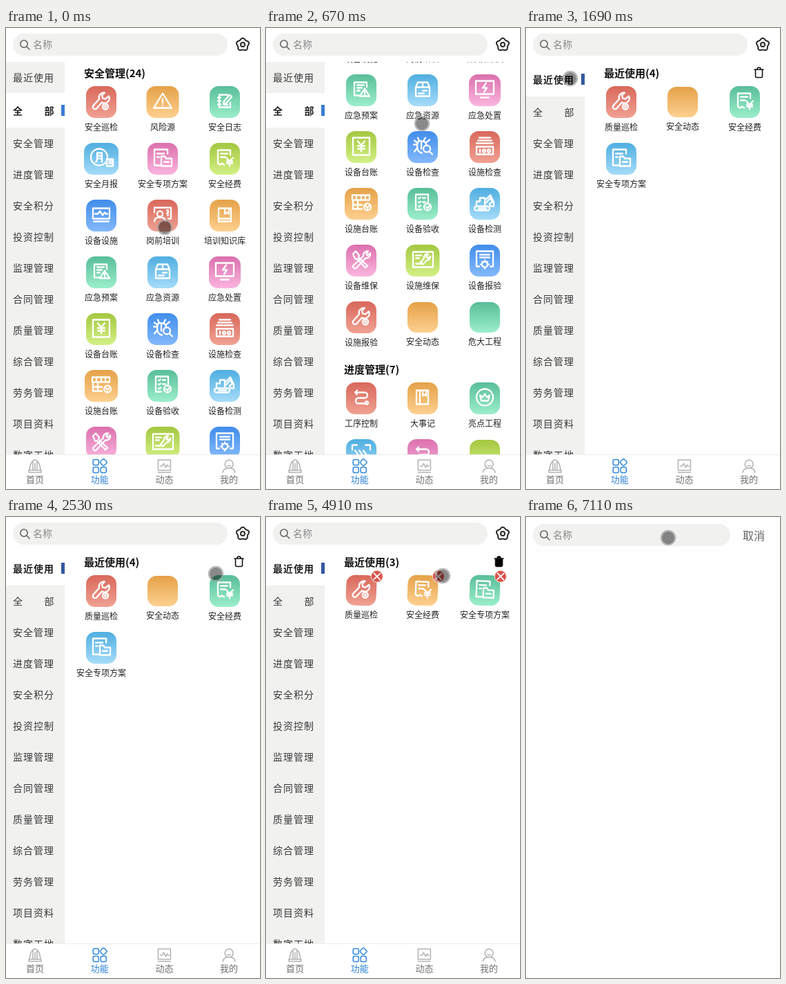
Animation, 368 px wide and 666 px high, one loop 8 s. Source, as an HTML page:

```html
<!DOCTYPE html>
<html lang="zh-CN">
<head>
<meta charset="utf-8">
<title>功能</title>
<style>
html, body { margin: 0; width: 100%; height: 100%; overflow: hidden; background: #fff; }
svg { display: block; width: 368px; height: 666px; }
text { font-family: "Noto Sans CJK SC", "Noto Sans CJK", "Noto Sans", sans-serif; }
.line { fill: none; stroke-linecap: round; stroke-linejoin: round; }
.glyph { stroke: #fff; stroke-width: 2.3; }
</style>
</head>
<body>
<svg id="stage" viewBox="0 0 368 666">
  <defs id="defs">
    <clipPath id="view"><rect y="49" width="368" height="567"/></clipPath>
  </defs>
  <g id="main">
    <g clip-path="url(#view)">
      <g id="all"></g>
      <g id="recent"></g>
      <g id="side"></g>
    </g>
    <g id="frame"></g>
  </g>
  <g id="search"></g>
  <g id="pointer">
    <circle r="9.2" fill="#000" fill-opacity=".46"/>
    <circle r="10.2" fill="none" stroke="#a0a0a0" stroke-opacity=".75" stroke-width="2"/>
  </g>
</svg>
<script>
const LOOP = 8000, TICK = 169.2;
const $ = id => document.getElementById(id);

// Glyph outlines, centred on 0,0
const circle = (x, y, r) => `M${x - r} ${y}a${r} ${r} 0 1 0 ${2 * r} 0a${r} ${r} 0 1 0 ${-2 * r} 0`;
const glyphs = {
  wrench: 'M5-12a7 7 0 0 0-8 9L-11 6a3 3 0 0 0 4 5L1 2a7 7 0 0 0 10-9L6-3 2-4 1-8z' + circle(6, 8, 4) + circle(6, 8, 1),
  warn: 'M0-11L13 10H-13zM0-3V3M0 6.5v.2',
  log: 'M4-9H-8V9H8V2M-10-5h4M-10 0h4M-10 5h4M-2 4l1-4 8-9 3 3-8 9zM-2 5h6',
  month: circle(-3, -1, 12) + 'M-6-7H1V6M-6-7V1q0 4-2 5M-6-3H1M-6 1H1M8 2h9v10H8zM11 5h4M11 8h4',
  plan: 'M-4 11H-12V-12H7V-6M-8-6H2M-8-1h3M-2-2h5l2 3h8v11H-2zM2 6h7',
  fee: 'M-1 10l-3-2-3 2-3-2V-11H8V-4M-6-6H4M-6-1H1M2 0l5 5 5-5M7 5v7M3 5h8M3 8h8',
  wave: 'M-12-9h24v15h-24zM-11 10h22M-9-1h4l3-4 4 6 3-4 2 2h2',
  train: circle(-4, -1, 4) + 'M-12 10q0-6 8-6t8 6M-12-3v-7h24V6H8M6-6h2v4H6M7 1h1',
  book: 'M-9-9H9V10H-9zM-9 6H9M0-9v8l3-2 3 2v-8',
  alert: 'M8-3v-7h-18V9h7M-6-6H4M-6-2h7M-6 2h4M5-1l7 11H-2zM5 3v3M5 8v.2',
  box: 'M-10-3l3-7H7l3 7V10H-10zM-10-3h20M0-10v7M0 2h6M-6 6H2',
  bolt: 'M-13-12h26V7h-26zM-6 12H6M2-9l-5 7h6l-4 6',
  yen: 'M-12-12h24v25h-24zM-5-7l5 6 5-6M0-1v9M-5 0H5M-5 4H5',
  bug: 'M-1 10Q-8 9-8 0T-2-7Q5-7 5-2M-5-7l-2-5M1-7l3-5M-8-2h-5M-8 3l-4 5M-7-4l-5-4M-2-7V4M5-5l5-4' + circle(6, 4, 5) + 'M10 8l4 4',
  machine: 'M-8-12H8M-10-8h20M-12-4h24M-12 1h24v11h-24zM-7 5v4' + circle(-1, 7, 2) + circle(6, 7, 2),
  shop: 'M-13-11h25v7h-25zM-7-11v7M0-11v7M6-11v7M-12-3V9H1M-12 3H1M-5-2V8' + circle(9, 6, 5) + 'M6 4l3 3 3-3M9 7v3',
  check: 'M8-1v-11h-18v22H-2M-6-7l1 1 2-2M0-7h4M-6-1l1 1 2-2M0-1h4M-6 5l1 1 2-2' + circle(7, 6, 5) + 'M5 6l2 2 3-4',
  digger: 'M-12 5H4a3 3 0 0 1 0 6H-12a3 3 0 0 1 0-6M-12 4v-6h5v-5h7v11M-9 8H2M0-3l8-8 5 10v6q-6 1-6-4l4-2-3-6-6 7',
  tools: 'M-12-8l4-4 5 6-1 3L9 9l-3 3L-6-1l-3 0zM10-12a6 6 0 0 0-7 7L-11 8a2 2 0 0 0 4 4L6-2a6 6 0 0 0 7-7L9-6 7-8z',
  board: 'M-14-11h29v22h-29zM-10-6h8M-10-2h5M-10 6h7M8-8a5 5 0 0 0-6 6L-3 4l3 3 6-6a5 5 0 0 0 5-6L8-2 5-4z',
  report: 'M-8 10h-4v-22h24v22H8M-7-7H7M-7-3H7' + circle(0, 7, 4) + 'M0 1v2M0 11v2M-6 7h2M4 7h2M-4 3l1 1M3 4l1-1',
  flow: 'M-8-7H5a4 4 0 0 1 0 8H-4a4 4 0 0 0 0 8H6M-6-10l-3 3 3 3' + circle(8, 8, 2),
  album: 'M-9-10H8V10H-9zM-4-10V10M0-10V-2l2-2 3 2v-8',
  crown: circle(0, 0, 12) + 'M-5 5H5L7-3 3 0 0-5-3 0-7-3z',
  scan: 'M-13-6v-7h7M6-13h7v7M13 6v7H6M-6 13h-7V6M-9-5l4 5-4 5M-3-5l4 5-4 5M3-5l4 5-4 5'
};

const tones = [
  ['#d8685b', '#f0a193'], ['#e5a148', '#fdd090'], ['#58be98', '#9ceecb'], ['#4faee0', '#a6dcf9'],
  ['#db70ad', '#fab5de'], ['#a4c740', '#d3f086'], ['#418deb', '#84b9fb']
];
const columns = [138, 227, 317];

// label, glyph, tile width
const safety = [
  ['安全巡检', 'wrench'], ['风险源', 'warn', 47], ['安全日志', 'log'],
  ['安全月报', 'month', 50], ['安全专项方案', 'plan'], ['安全经费', 'fee'],
  ['设备设施', 'wave'], ['岗前培训', 'train'], ['培训知识库', 'book'],
  ['应急预案', 'alert'], ['应急资源', 'box'], ['应急处置', 'bolt', 46],
  ['设备台账', 'yen'], ['设备检查', 'bug'], ['设施检查', 'machine'],
  ['设施台账', 'shop', 48], ['设备验收', 'check'], ['设备检测', 'digger'],
  ['设备维保', 'tools'], ['设施维保', 'board', 49], ['设备报验', 'report'],
  ['设施报验', 'wrench'], ['安全动态'], ['危大工程']
];
const progress = [
  ['工序控制', 'flow'], ['大事记', 'album'], ['亮点工程', 'crown'],
  ['施工进度', 'scan'], ['工序检查Flow', 'flow'], ['进度上报'], ['工序上报']
];
const recents = [['质量巡检', 'wrench'], ['安全动态'], ['安全经费', 'fee'], ['安全专项方案', 'plan']];

const menu = ['最近使用', '全部', '安全管理', '进度管理', '安全积分', '投资控制', '监理管理',
  '合同管理', '质量管理', '综合管理', '劳务管理', '项目资料', '数字工地'];

// y is the middle of the characters
const text = (s, x, y, size, fill, extra = '') =>
  `<text x="${x}" y="${y + size * .38}" font-size="${size}" fill="${fill}" ${extra}>${s}</text>`;
const centred = 'text-anchor="middle"';
const path = (d, x, y, attrs) => `<path class="line" transform="translate(${x} ${y})" d="${d}" ${attrs}/>`;
const heading = (s, y) => text(s, 113, y, 15, '#111', 'font-weight="700"');

function tile([label, glyph, width = 44], i, top, height, angle, badge) {
  const x = columns[i % 3], mid = top + height / 2;
  const mark = glyph ? `<path class="line glyph" transform="translate(${x} ${mid - 1.5})" d="${glyphs[glyph]}"/>` : '';
  const cross = badge ? `<g transform="translate(${x + 22} ${top + 1})">
    <circle r="8.5" fill="#d9544c" stroke="#f6dcd8"/>
    <path class="line" d="M-4.5-4.5l9 9M4.5-4.5l-9 9" stroke="#fff" stroke-width="1.8"/></g>` : '';
  return `<g transform="rotate(${angle} ${x} ${mid})">
    <rect x="${x - width / 2}" y="${top}" width="${width}" height="${height}" rx="13" fill="url(#tone${i % 7})"/>
    ${mark}${cross}</g>` + text(label, x, top + height + 13, 12, '#222', centred);
}

function grid(items, top) {
  return items.map((item, i) => {
    const first = i - i % 3;
    const tall = items.slice(first, first + 3).some(it => it[1]);
    const shift = tall && !item[1] ? 1 : 0;
    return tile(item, i, top + first / 3 * 82 + shift, item[1] ? 46 : 44, 0, false);
  }).join('');
}

function recentPage(items, editing, angle) {
  const bin = 'M-6.5-4.5h13M-2.5-5q0-2.5 2.5-2.5t2.5 2.5M-5-4.5V5q0 2 2 2h6q2 0 2-2v-9.5';
  const body = editing
    ? items.map((it, i) => tile(it, i, 84 + 80 * Math.floor(i / 3), 44, angle, true)).join('')
    : grid(items, 84);
  return heading(`最近使用(${items.length})`, 65) + body +
    path(bin, 337.5, 64.5, `stroke="#111" stroke-width="1.6" style="fill:${editing ? '#000' : 'none'}"`);
}

function sidebar(active) {
  let y = 49, out = '<rect y="49" width="85" height="567" fill="#f1f1f0"/>';
  menu.forEach((name, i) => {
    const on = i === active, h = on ? 50 : 45, mid = y + h / 2 + .5;
    if (on) out += `<rect y="${y}" width="85" height="50" fill="#fff"/>
      <rect x="80" y="${y + 17}" width="5" height="16" fill="${i ? '#3a7dd4' : '#3459a0'}"/>`;
    const style = `letter-spacing="1" font-weight="${on ? 700 : 400}"`;
    const put = (s, x) => { out += text(s, x, mid, 14, on ? '#222' : '#3a3a3a', style); };
    if (name.length === 2) { put(name[0], 10); put(name[1], 55.5); }
    else put(name, 10);
    y += h;
  });
  return out;
}

function searchBox(y, width) {
  return `<rect x="10" y="${y}" width="${width}" height="32" rx="16" fill="#f1f1f0"/>` +
    path(circle(-1, -1, 5.2) + 'M3 3l4 4', 27, y + 16, 'stroke="#666" stroke-width="1.6"') +
    text('名称', 39, y + 16, 14, '#8a8a8a');
}

// Five-lobed cog with one lobe on top
function cog() {
  const points = Array.from({ length: 40 }, (_, i) => {
    const a = i * Math.PI / 20, r = 8.4 + Math.cos(5 * a);
    return `${(r * Math.sin(a)).toFixed(2)} ${(-r * Math.cos(a)).toFixed(2)}`;
  });
  return `M${points.join('L')}z` + circle(0, 0, 3);
}

function chrome() {
  const square = (x, y) => `M${x + 2} ${y}h4q2 0 2 2v4q0 2-2 2h-4q-2 0-2-2v-4q0-2 2-2z`;
  const diamond = 'M4.5-10q1-1 2 0l3.5 3.5q1 1 0 2L6.5-1q-1 1-2 0L1-4.5q-1-1 0-2z';
  const tabs = [
    ['首页', 'M-9 9V6H9v3zM-8 6Q-7-5-3-7M8 6Q7-5 3-7M-3 5V-7q0-2 3-2t3 2V5M0 5V-4'],
    ['功能', square(-9.5, -9.5) + square(-9.5, 1.5) + square(1.5, 1.5) + diamond],
    ['动态', 'M-9-9H9V6H-9zM-9 9H9M-6 0h3l2-4 3 6 2-4 1 2h2'],
    ['我的', circle(0, -3, 6) + 'M-9 9q1-5 6-6M9 9q-1-5-6-6M-2-1q2 2 4 0']
  ];
  return searchBox(8, 311) +
    path(cog(), 343, 24, 'stroke="#2b2b28" stroke-width="2"') +
    '<path d="M0 616.5H368" stroke="#ededed"/>' +
    tabs.map(([name, d], i) => {
      const x = 42 + 93.7 * i, on = i === 1;
      return path(d, x, 633, `stroke="${on ? '#2f88dd' : '#b2b2b2'}" stroke-width="1.5"`) +
        text(name, x, 652, 13, on ? '#2a80d8' : '#707070', centred);
    }).join('');
}

$('defs').innerHTML += tones.map(([a, b], i) => `<linearGradient id="tone${i}" x2="0" y2="1">
  <stop stop-color="${a}"/><stop offset="1" stop-color="${b}"/></linearGradient>`).join('');
$('all').innerHTML = heading('安全管理(24)', 65) + grid(safety, 84) +
  heading('进度管理(7)', 756) + grid(progress, 775) + heading('安全积分(6)', 1035);
$('frame').innerHTML = chrome();
$('search').innerHTML = '<rect width="368" height="666" fill="#fefefe"/>' + searchBox(10, 286) +
  text('取消', 330, 27, 16, '#666', centred);

// [step, value...] rows, linear between them
const scroll = [[0, 0], [1, 25], [2, 95], [3, 175], [4, 263], [5, 348], [6, 415]];
const touch = [
  [0, 230, 288], [1, 229, 250], [3, 226, 138], [4, 226, 138], [6, 193, 194], [7, 94, 104], [8, 64, 73],
  [12, 64, 73], [15, 304, 82], [17, 343, 65], [19, 343, 70], [23, 256, 85], [30, 256, 85],
  [32, 335, 62], [34, 337, 62], [37, 206, 30]
];
const OPEN_RECENT = 10, EDIT_ON = 18, EDIT_OFF = 34, OPEN_SEARCH = 41;

function at(rows, k) {
  const n = rows.findIndex(r => r[0] > k);
  if (n < 0) return rows[rows.length - 1].slice(1);
  const a = rows[n - 1], b = rows[n], p = (k - a[0]) / (b[0] - a[0]);
  return a.slice(1).map((v, i) => v + (b[i + 1] - v) * p);
}

const show = (id, on) => $(id).setAttribute('display', on ? 'inline' : 'none');

function render(k) {
  const recent = k >= OPEN_RECENT;
  show('all', !recent);
  show('recent', recent);
  $('all').setAttribute('transform', `translate(0 ${-at(scroll, k)[0]})`);
  $('side').innerHTML = sidebar(recent ? 0 : 1);
  if (recent) {
    const items = recents.filter((_, i) => !(i === 1 && k >= 25) && !(i === 2 && k >= 30));
    const angle = 2.2 * Math.cos((k - 22) * 4 * Math.PI / 7);
    $('recent').innerHTML = recentPage(items, k >= EDIT_ON && k < EDIT_OFF, angle);
  }
  show('search', k >= OPEN_SEARCH);
  $('search').setAttribute('opacity', k === OPEN_SEARCH ? .6 : 1);
  show('pointer', k < 20 || k > 22);
  $('pointer').setAttribute('transform', `translate(${at(touch, k).join(' ')})`);
}

let last = -1;
function frame() {
  const k = Math.floor((performance.now() % LOOP + 8) / TICK);
  if (k !== last) render(last = k);
  requestAnimationFrame(frame);
}
frame();
</script>
</body>
</html>
```
